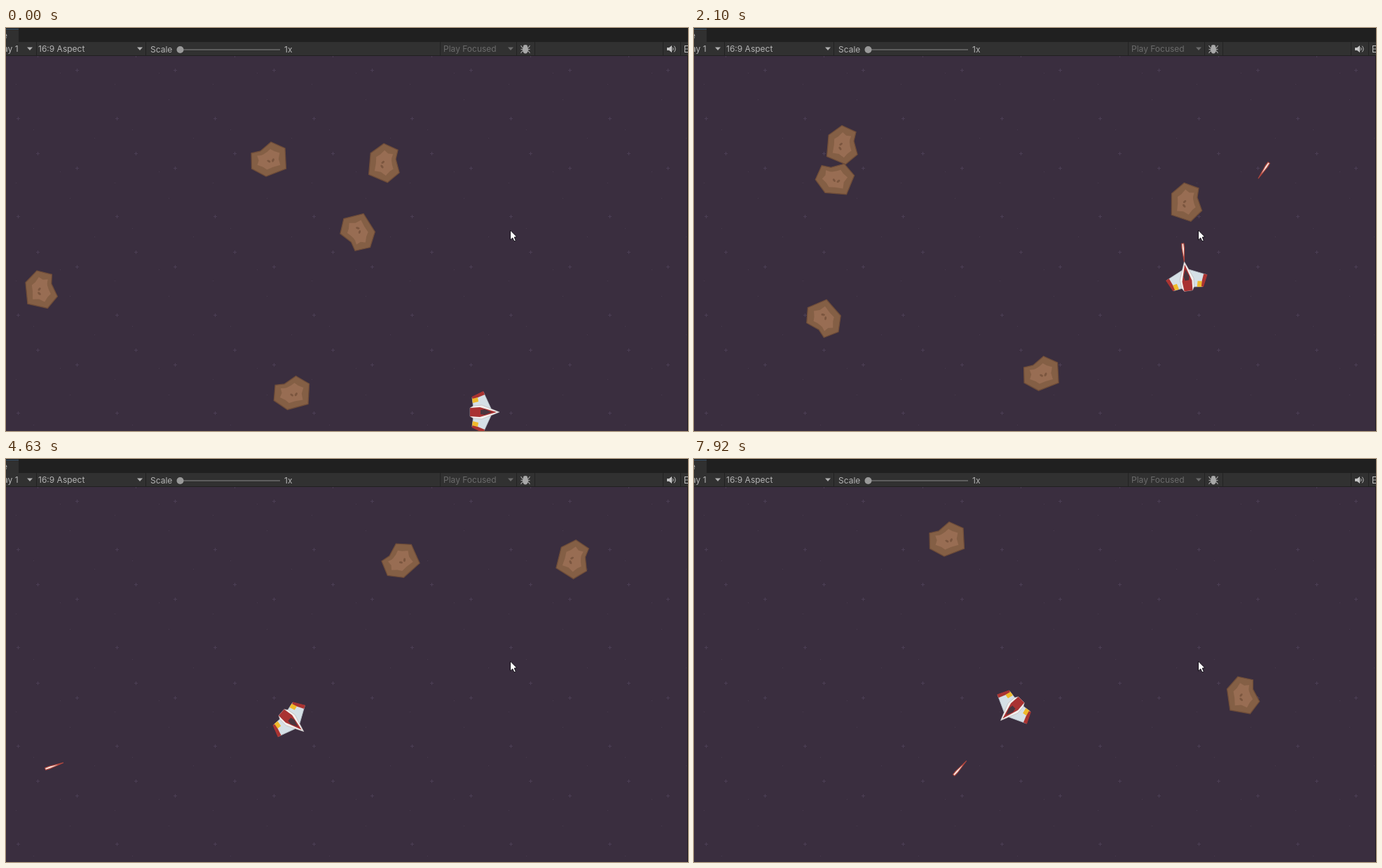
Recreate the animation shown at these times as an HTML page with a canvas. Size 973 by 576 pixels, loop 7990 ms.

```html
<!DOCTYPE html>
<html lang="en">
<head>
<meta charset="utf-8">
<title>Asteroids game view</title>
<style>
html, body { margin: 0; width: 100%; height: 100%; overflow: hidden; background: #202020; }
canvas { display: block; }
</style>
</head>
<body>
<canvas id="stage" width="973" height="576"></canvas>
<script>
const ctx = document.getElementById('stage').getContext('2d');
const LOOP = 7990, STEP = LOOP / 114;
const VIEW = { top: 40, right: 972, bottom: 576 };
const ROCK_SPEED = 156.5, BULLET_SPEED = 500, NOSE = 22, HIT_RADIUS = 22;
const RAD = Math.PI / 180;

// Each rock drifts in a straight line through x, y at time t (s), turned to its heading.
const rocks = [
  [0, 375, 188, 68.5], [0, 540, 193, 184.5], [0, 502, 292, -32.6], [0, 50, 374, 174],
  [0, 408, 522, 74.5], [0.84, 900, 249, 180], [2.1, 185, 416, -41.6], [2.1, 201, 215, 94],
  [4.63, 809, 143, 193.6], [4.63, 563, 146, 47.5], [6.73, 308, 469, -27],
  [7.92, 783, 338, 171.5], [7.92, 361, 115, 68.5]
].map(([t, x, y, heading]) => ({ t, x, y, heading, end: Infinity }));

// Ship turning points: time, x, y, heading
const shipPath = [
  [0, 681, 549, 0], [0.7, 677, 503, -113], [0.84, 675, 495, -113], [1, 679, 476, -84],
  [1.69, 685, 393, -56], [2.1, 703, 357, -98], [2.88, 632, 289, -151], [3.01, 623, 285, -159],
  [3.8, 480, 297, -199], [4.63, 407, 375, -320], [5.45, 460, 320, -418],
  [6.73, 556, 234.5, -571], [6.9, 541, 265, -578.5], [7.3, 505, 300, -594], [8, 447, 365, -584]
];

const shots = [0.71, 1, 1.69, 2.07, 2.89, 3.2, 3.8, 4.9, 5.15, 5.45, 5.8, 6.9, 7.3, 7.68];

function along(x, y, heading, distance) {
  return [x + distance * Math.cos(heading * RAD), y + distance * Math.sin(heading * RAD)];
}

const travel = (body, speed, t) => along(body.x, body.y, body.heading, speed * (t - body.t));

function shipAt(t) {
  const i = shipPath.findIndex(key => key[0] > t);
  const a = shipPath[i - 1], b = shipPath[i];
  const k = (t - a[0]) / (b[0] - a[0]);
  return [1, 2, 3].map(n => a[n] + (b[n] - a[n]) * k);
}

// A bullet leaves the nose and flies until it hits a rock or leaves the view.
function fire(start) {
  const [shipX, shipY, heading] = shipAt(start);
  const [x, y] = along(shipX, shipY, heading, NOSE);
  const bullet = { t: start, x, y, heading };
  for (let t = start; ; t += 0.01) {
    const [bx, by] = travel(bullet, BULLET_SPEED, t);
    const hit = rocks.find(rock => {
      const [rx, ry] = travel(rock, ROCK_SPEED, t);
      return t < rock.end && Math.hypot(rx - bx, ry - by) < HIT_RADIUS;
    });
    if (hit) hit.end = t;
    if (hit || bx < -15 || bx > VIEW.right + 15 || by < VIEW.top - 15 || by > VIEW.bottom + 15)
      return { ...bullet, end: t };
  }
}
const bullets = shots.map(fire);

function poly(points, fill, stroke, width = 1) {
  ctx.beginPath();
  for (const [x, y] of points) ctx.lineTo(x, y);
  ctx.closePath();
  ctx.fillStyle = fill;
  ctx.fill();
  if (stroke) { ctx.strokeStyle = stroke; ctx.lineWidth = width; ctx.stroke(); }
}

function rect(x, y, w, h, fill) {
  ctx.fillStyle = fill;
  ctx.fillRect(x, y, w, h);
}

function ellipse(x, y, rx, ry, fill, turn = 0) {
  ctx.beginPath();
  ctx.ellipse(x, y, rx, ry, turn, 0, 7);
  ctx.fillStyle = fill;
  ctx.fill();
}

function line(points, stroke, width = 1) {
  ctx.beginPath();
  for (const [x, y] of points) ctx.lineTo(x, y);
  ctx.strokeStyle = stroke;
  ctx.lineWidth = width;
  ctx.stroke();
}

function placed([x, y], degrees, draw) {
  ctx.save();
  ctx.translate(x, y);
  ctx.rotate(degrees * RAD);
  draw();
  ctx.restore();
}

const mirrored = half => [...half, ...half.map(([x, y]) => [x, -y]).reverse()];

function drawStars() {
  const period = 140.6;
  for (let gx = 0; gx < 7; gx++) for (let gy = 0; gy < 4; gy++) {
    const at = (x, y) => [Math.round(gx * period + x), Math.round(gy * period + y)];
    for (const star of [[17, 128.5], [44.5, 38.5], [100.5, 59.5]]) {
      const [x, y] = at(...star);
      rect(x - 2, y, 5, 1, '#4b3e54');
      rect(x, y - 2, 1, 5, '#4b3e54');
    }
    for (const dot of [[91, 102], [126, 157], [14, 80], [39, 145], [77, 64]])
      rect(...at(...dot), 1, 1, '#483b4e');
  }
}

const rockOutline = [[-25, -9], [-12, -12], [3, -25], [23, -16], [24.5, 13], [-4, 24], [-24.5, 13]];
// The inner face is the outline shrunk, with a dent in the middle of every edge.
const rockFace = rockOutline.flatMap(([x, y], i) => {
  const [nx, ny] = rockOutline[(i + 1) % rockOutline.length];
  return [[x * 0.67, y * 0.6], [(x + nx) * 0.29, (y + ny) * 0.29]];
});

function drawRock() {
  poly(rockOutline, '#845f45', '#6f4d39', 1.3);
  poly(rockFace, '#986d53');
  ellipse(0, 2.5, 2.6, 1.5, '#7b563f', 0.5);
  ellipse(6, 1, 2.8, 1.6, '#7b563f', -1.1);
}

function drawBullet() {
  poly(mirrored([[14, 2], [8, 2.4], [-14, 0.5]]), '#b2473e');
  poly(mirrored([[13, 0.9], [6, 1.1], [-6, 0]]), '#f5e6df');
}

function drawShip() {
  for (const side of [-1, 1]) {
    ctx.save();
    ctx.scale(1, side);
    poly([[11, 5], [0, 29], [-16, 21], [-14, 5]], '#d5e0e6', '#b9c3ca', 0.8);
    poly([[0, 30], [-16.5, 22], [-15, 18], [2, 25]], '#a93331');
    poly([[-16, 19], [-8, 21], [-7, 15], [-15, 13]], '#efba2c');
    ctx.restore();
  }
  poly(mirrored([[23, 0], [-2, 10], [-14, 9], [-19, 6]]), '#f2f0ee', '#b8b2b4', 0.6);
  poly(mirrored([[19, 0], [-5, 7], [-19, 6]]), '#a93232');
  poly(mirrored([[12, 0], [2, 4], [-4, 3]]), '#49343d');
}

function label(text, x, y = 34, color = '#b5b5b5') {
  ctx.font = '12px Inter, "Open Sans", sans-serif';
  ctx.fillStyle = color;
  ctx.fillText(text, x, y);
}

function arrow(x, color = '#b0b0b0') {
  poly([[x - 4, 27.5], [x + 4, 27.5], [x, 32]], color);
}

function drawBug(x, y, color) {
  for (const side of [-1, 1]) for (const row of [-1, 0, 1])
    line([[x, y + row * 2.5], [x + 4.5 * side, y + row * 2.5], [x + 6.5 * side, y + row * 5.5]], color, 1.2);
  ellipse(x, y + 0.5, 4, 5.5, color);
  ellipse(x, y - 4.5, 3, 2, color);
}

function drawToolbar() {
  rect(0, 0, 973, 40, '#202020');
  rect(0, 0, 973, 1, '#171717');
  rect(0, 1, 18, 20, '#303030');
  rect(0, 1, 18, 1, '#36506b');
  rect(0, 20, 973, 19, '#313131');
  for (const x of [43, 199, 619, 728, 754, 937, 962]) rect(x, 20, 1, 19, '#222');
  label('e', -5, 15);
  label('ay 1', -4);
  label('16:9 Aspect', 46);
  label('Scale', 206, 35);
  label('1x', 397, 35);
  label('Play Focused', 624, 34, '#6b6b6b');
  arrow(34);
  arrow(191);
  arrow(720, '#6b6b6b');
  rect(248, 30, 143, 2, '#5d5d5d');
  ellipse(248.5, 31, 5, 5, '#999');
  drawBug(741, 30.5, '#a8a8a8');

  // Speaker and grid buttons
  poly([[943, 28], [946, 28], [950, 25], [950, 35], [946, 32], [943, 32]], '#c4c4c4');
  ctx.strokeStyle = '#c4c4c4';
  ctx.lineWidth = 1;
  for (const r of [3, 6]) {
    ctx.beginPath();
    ctx.arc(949, 30, r, -0.8, 0.8);
    ctx.stroke();
  }
  ctx.strokeRect(968.5, 25.5, 9, 9);
  line([[968, 30], [973, 30]], '#aaa');
}

function drawCursor() {
  poly([[719.5, 289], [719.5, 303], [722.7, 300], [725, 304.8], [727.3, 303.8],
    [725.2, 299], [729, 298.7]], '#fff', '#16111a');
}

function draw(t) {
  rect(0, 0, 973, 576, '#1f1c21');
  ctx.save();
  ctx.beginPath();
  ctx.rect(0, VIEW.top, VIEW.right, VIEW.bottom - VIEW.top);
  ctx.clip();
  rect(0, VIEW.top, VIEW.right, VIEW.bottom, '#3a2e3f');
  drawStars();
  for (const rock of rocks)
    if (t < rock.end) placed(travel(rock, ROCK_SPEED, t), rock.heading - 68.5, drawRock);
  for (const bullet of bullets)
    if (t >= bullet.t && t < bullet.end)
      placed(travel(bullet, BULLET_SPEED, t), bullet.heading, drawBullet);
  const [x, y, heading] = shipAt(t);
  placed([x, y], heading, drawShip);
  ctx.restore();
  drawToolbar();
  drawCursor();
}

function tick() {
  const frame = Math.floor((performance.now() % LOOP) / STEP + 0.1);
  draw(Math.min(frame, 113) * STEP / 1000);
  requestAnimationFrame(tick);
}
tick();
</script>
</body>
</html>
```
